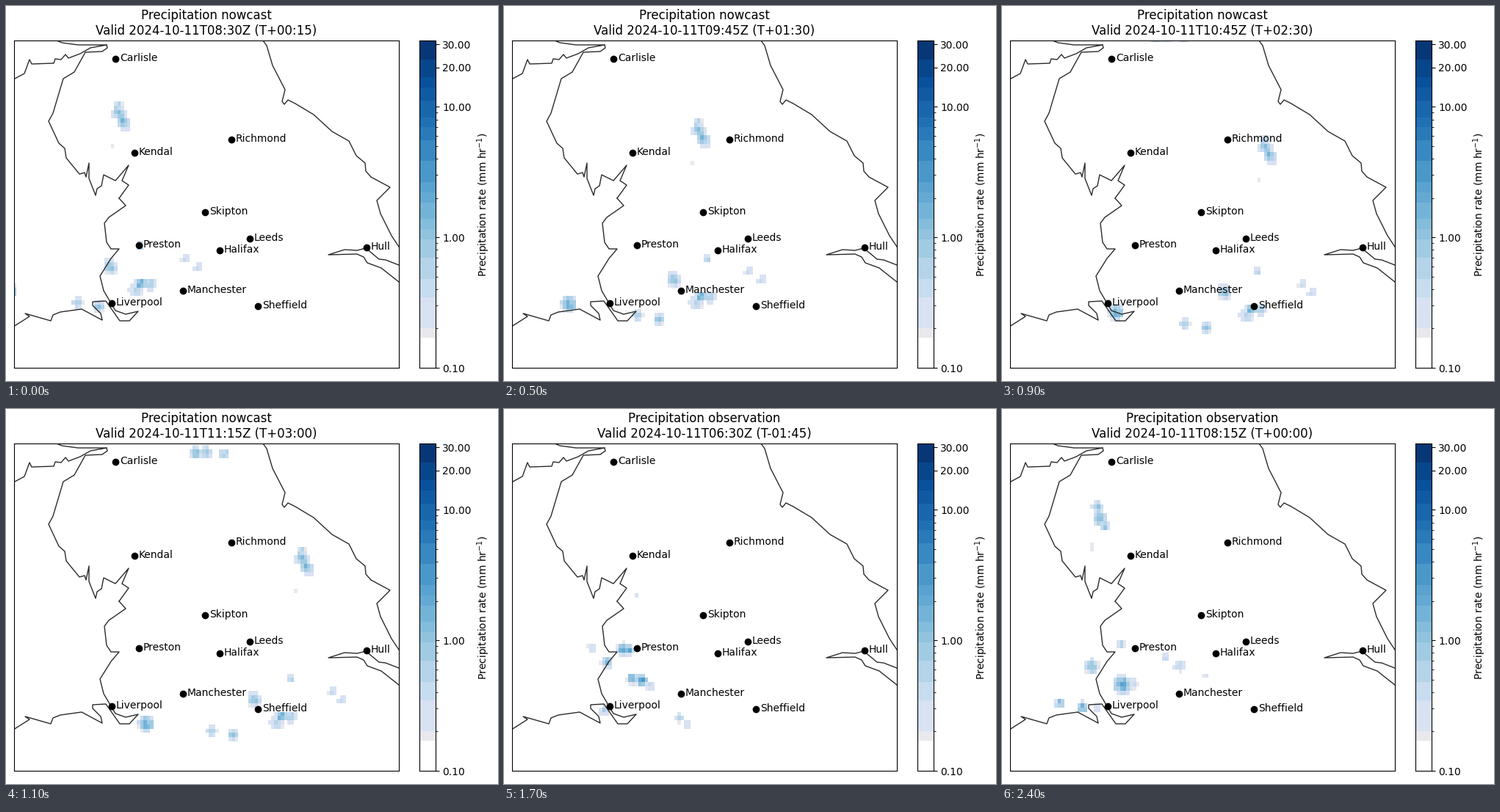
Write a matplotlib script that moves like this. It is 670 by 511 pixels and loops after 2.5 s.

```python
import numpy as np
import matplotlib.pyplot as plt
from matplotlib.animation import FuncAnimation
from matplotlib.colors import BoundaryNorm, ListedColormap
from matplotlib.ticker import FixedLocator, FormatStrFormatter, NullFormatter

W, H, DPI = 670, 511, 100
FRAMES, INTERVAL = 25, 100
FORECASTS = 12                      # forecast steps come first, then the observations
COLS, ROWS = 119, 79
CW, CH, X0, Y0 = 4.455, 5.75, 8.6, 44.25
RATE_MIN, RATE_MAX, DRY = 0.1, 32, 0.17

plt.rcParams["font.family"] = "DejaVu Sans"
fig = plt.figure(figsize=(W / DPI, H / DPI), dpi=DPI, facecolor="white")


def add_axes(left, top, right, bottom):
    return fig.add_axes([left / W, 1 - bottom / H, (right - left) / W, (bottom - top) / H])


# Colour scale: band limits as heights on the bar, in pixels
band_y = np.array([493, 452, 439, 397, 372, 343, 318, 304, 290, 268, 254, 240,
                   211, 183, 165, 152, 129, 111, 97, 73, 47])
frac = (493 - band_y) / 446
bounds = RATE_MIN * (RATE_MAX / RATE_MIN) ** frac
colours = [plt.cm.Blues(m) for m in (frac[:-1] + frac[1:]) / 2]
colours[:3] = ["white", "#e8e8ed", "#d8e2f2"]
cmap = ListedColormap(colours)
cmap.set_bad((1, 1, 1, 0))
norm = BoundaryNorm(bounds, len(colours))

bar = add_axes(562.5, 47.5, 584.5, 493)
bar.set_yscale("log")
bar.set_ylim(RATE_MIN, RATE_MAX)
bar.set_xticks([])
for low, high, colour in zip(bounds[:-1], bounds[1:], colours):
    bar.axhspan(low, high, color=colour, lw=0)
bar.yaxis.tick_right()
bar.yaxis.set_label_position("right")
bar.yaxis.set_major_locator(FixedLocator([0.1, 1, 10, 20, 30]))
bar.yaxis.set_major_formatter(FormatStrFormatter("%.2f"))
bar.yaxis.set_minor_locator(FixedLocator([d * s for s in (0.1, 1) for d in range(2, 10)]))
bar.yaxis.set_minor_formatter(NullFormatter())
bar.set_ylabel("Precipitation rate (mm hr$^{-1}$)")

# Map, in stage pixels
ax = add_axes(10.5, 47.5, 534.5, 492.5)
rain = ax.imshow(np.full((ROWS, COLS), np.nan), cmap=cmap, norm=norm,
                 extent=(X0, X0 + COLS * CW, Y0 + ROWS * CH, Y0),
                 interpolation="nearest", aspect="auto", zorder=0)
ax.set(xlim=(10.5, 534.5), ylim=(492.5, 47.5), xticks=[], yticks=[])


def coast(*points):
    ax.plot(*zip(*points), color="#2b2b2b", lw=1, zorder=1)


coast((10, 100), (25, 92), (32, 73), (35, 79), (65, 78), (67, 72), (75, 73), (81, 66),
      (85, 71), (101, 65), (115, 57), (137, 53), (98, 53), (76, 50), (69, 47))
coast((137, 53), (138, 57), (131, 62), (108, 63), (93, 90), (78, 99), (64, 146), (58, 157),
      (72, 187), (80, 194), (82, 207), (100, 229), (107, 227), (109, 233), (113, 214),
      (113, 235), (122, 258), (124, 249), (130, 245), (133, 230), (149, 238), (167, 217),
      (158, 238), (167, 244), (154, 262))
coast((154, 262), (163, 272), (140, 288), (134, 296), (137, 322), (143, 331), (154, 331),
      (143, 344), (128, 368), (133, 388), (149, 415), (163, 420), (180, 416), (168, 429),
      (155, 429), (136, 402), (118, 403), (118, 408), (129, 419), (131, 428), (103, 413),
      (74, 417), (64, 421), (61, 429), (26, 419), (32, 423), (10, 437))
coast((350, 47), (355, 54), (363, 81), (380, 114), (376, 130), (379, 134), (384, 128),
      (394, 133), (419, 148), (444, 171), (467, 184), (477, 204), (489, 214), (490, 225),
      (497, 233), (523, 247), (505, 265), (510, 283), (525, 313), (535, 328))
coast((535, 353), (517, 346), (508, 345), (490, 330), (478, 333), (461, 332), (439, 339),
      (478, 338), (487, 342), (492, 350), (511, 357), (535, 376))

cities = {
    "Carlisle": (148.5, 72), "Kendal": (174.5, 200), "Richmond": (306.5, 182),
    "Skipton": (270.5, 281), "Preston": (180.5, 326), "Leeds": (331.5, 317),
    "Halifax": (290.5, 333), "Hull": (490.5, 329), "Manchester": (240.5, 388),
    "Liverpool": (143.5, 405), "Sheffield": (342.5, 409),
}
for name, (x, y) in cities.items():
    ax.plot(x, y, "ko", zorder=3)
    ax.text(x + 6.4, y + 3, name, zorder=3)

# Forecast storms at the first step: x, y, then cells (dx, dy, radius, peak rate)
storms = [
    (155, 150, [(-3, -13, 7, .7), (-2, -3, 10, 1.2), (4, 8, 9, 1.8), (8, 14, 7, .6),
                (-11, 40, 3, .19)]),
    (142, 355, [(0, 0, 11, .9)]),
    (183, 378, [(0, 0, 9, 1.8), (13, 1, 9, .6), (-7, 9, 10, .45)]),
    (243, 344, [(0, 0, 6, .4)]),
    (262, 354, [(0, 2, 7, .35)]),
    (183, 328, [(0, 0, 6, .45)]),
    (97, 404, [(0, 0, 8, .9)]),
    (126, 409, [(0, 0, 8, 1.2)]),
    (3, 388, [(0, 0, 12, 1.7)]),
    (-20, -5, [(-7, -4, 9, 1.2), (7, -4, 9, 1.2), (31, -3, 8, .8)]),
]

# Observed scenes: cells (x, y, radius, peak rate)
early = [(117, 324, 7, 1.4), (126, 322, 7, .5), (96, 339, 6, .5), (169, 330, 6, .4),
         (135, 361, 9, 1), (147, 366, 8, 1.2), (166, 386, 6, .25), (98, 395, 4, .25),
         (249, 364, 4, .25), (192, 409, 7, .9), (206, 414, 7, .6), (213, 427, 7, .25)]
rising = [(162, 327, 10, 1.6), (170, 328, 7, 2.4), (119, 324, 6, .25), (140, 345, 9, 1.2),
          (175, 367, 9, 1.6), (187, 370, 9, 2.4), (197, 377, 7, .5), (180, 254, 3, .2),
          (137, 411, 8, .4), (238, 421, 7, .4), (249, 430, 6, .25)]
later = [(90, 152, 8, .6), (131, 152, 6, .6), (138, 319, 4, 1.2), (171, 333, 6, .5),
         (182, 339, 9, .3), (176, 348, 6, .7), (208, 350, 7, .6), (219, 352, 6, .4),
         (82, 345, 6, .3), (120, 369, 13, 1.2), (34, 397, 7, .9), (69, 402, 12, 1.4),
         (266, 386, 9, .4), (188, 418, 4, .2)]
latest = [(130, 134, 8, 1), (133, 150, 10, 1.4), (140, 160, 7, .8), (122, 187, 4, .2),
          (162, 321, 6, .6), (122, 351, 11, 1), (163, 376, 14, 1.8), (176, 374, 9, .4),
          (222, 338, 6, .5), (241, 350, 8, .45), (276, 364, 4, .2), (79, 401, 8, 1.1),
          (109, 406, 9, 1.3), (128, 406, 6, .25)]
scenes = {14: early, 17: rising, 21: later, 24: latest}


def stamp(field, cells, shift, seed):
    """Add rain cells moved by whole grid squares; their grain moves along."""
    c, r = round(shift[0] / CW), round(shift[1] / CH)
    grain = np.exp(0.22 * np.random.default_rng(seed).normal(size=(ROWS, COLS)))
    grain = np.roll(grain, (r, c), (0, 1))
    gx = X0 + (np.arange(COLS) - c + 0.5) * CW
    gy = Y0 + (np.arange(ROWS)[:, None] - r + 0.5) * CH
    for x, y, radius, peak in cells:
        d2 = ((gx - x) ** 2 + (gy - y) ** 2) / radius ** 2
        rate = np.maximum(peak * (DRY / peak) ** d2 * grain, DRY * 1.01)
        np.maximum(field, np.where(d2 < 1, rate, 0), out=field)


def wind(y):
    """Drift per step, stronger in the north."""
    return 26 - 0.023 * y, 6 - 0.0065 * y


def rain_field(step):
    field = np.zeros((ROWS, COLS))
    if step < FORECASTS:
        for i, (x, y, cells) in enumerate(storms):
            u, v = wind(y)
            placed = [(x + dx, y + dy, *rest) for dx, dy, *rest in cells]
            stamp(field, placed, (u * step, v * step), i)
    else:
        key = min(scenes, key=lambda s: (abs(s - step), -s))
        age = step - key
        stamp(field, scenes[key], (15 * age, 1.7 * age), key)
    return np.where(field > 0, field, np.nan)


def clock(minutes):
    return f"{minutes // 60:02d}:{minutes % 60:02d}"


title = ax.set_title("\n")


def draw(step):
    forecast = step < FORECASTS
    lead = 15 * (step + 1 if forecast else step - FRAMES + 1)
    kind = "nowcast" if forecast else "observation"
    sign = "-" if lead < 0 else "+"
    title.set_text(f"Precipitation {kind}\n"
                   f"Valid 2024-10-11T{clock(495 + lead)}Z (T{sign}{clock(abs(lead))})")
    rain.set_data(rain_field(step))
    return rain, title


anim = FuncAnimation(fig, draw, frames=FRAMES, interval=INTERVAL, repeat=True, blit=False)
plt.show()
```
